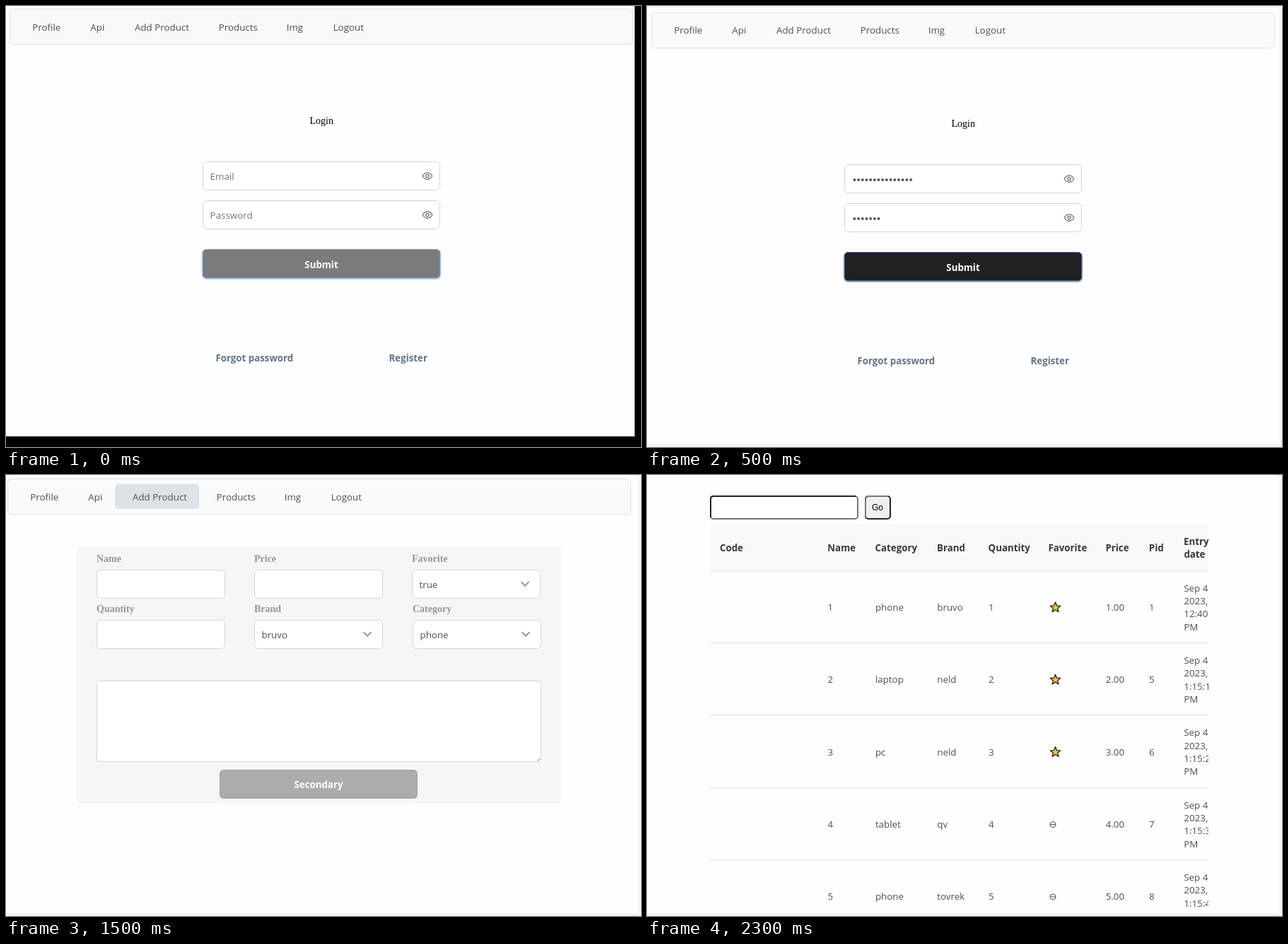
Write an HTML page that moves like this. It is 898x624 px and loops after 2.5 s.

```html
<!DOCTYPE html>
<html lang="en">
<head>
<meta charset="utf-8">
<title>Shop admin tour</title>
<style>
  html, body { margin: 0; width: 100%; height: 100%; overflow: hidden; background: #fefefe; }
  svg { display: block; width: 898px; height: 624px; }
  text { font: 13.35px "Open Sans", sans-serif; fill: #495057; }
  .hint { fill: #6c757d; }
  .bold { font-weight: 700; font-size: 13.3px; }
  .head { fill: #343a40; }
  .link { fill: #64748b; }
  .white { fill: #fff; }
  .mid { text-anchor: middle; }
  .serif { font: 14px "Liberation Serif", serif; fill: #000; }
  .label { font-weight: 700; fill: #979797; }
  .go { font: 12px "Liberation Sans", sans-serif; fill: #000; }
  .field { fill: #fff; stroke: #d1d5d8; }
  .line { fill: none; stroke: #6c757d; stroke-width: 1.3; }
  .glow { stroke: #6d97e2; filter: drop-shadow(0 1px 1px #8fb0e8); }
  .dark { stroke: #3f6cba; filter: drop-shadow(0 1px 1px #0008); }
  .scene { visibility: hidden; animation: show 2.5s step-end infinite; }
  @keyframes show {
    0% { visibility: visible; }
    20%, 100% { visibility: hidden; }
  }
</style>
</head>
<body>
<svg id="stage" viewBox="0 0 898 624"></svg>
<script>
const text = (x, y, str, cls = '') => `<text x="${x}" y="${y}" class="${cls}">${str}</text>`;
const rect = (x, y, w, h, attrs = '') =>
  `<rect x="${x}" y="${y}" width="${w}" height="${h}" ${attrs}/>`;
const path = (d, attrs = 'class="line"') => `<path d="${d}" ${attrs}/>`;
const at = (x, y, body) => `<g transform="translate(${x} ${y})">${body}</g>`;
const times = (n, fn) => Array.from({ length: n }, (_, i) => fn(i)).join('');

// Boxes take their outer pixel edges; the 1px stroke sits inside.
const box = (x, y, w, h, attrs = 'class="field"') =>
  rect(x + .5, y + .5, w - 1, h - 1, `rx="5" ${attrs}`);

const eye = (x, y) => at(x, y,
  path('M-6.8 0C-3.6-6.3 3.6-6.3 6.8 0C3.6 6.3-3.6 6.3-6.8 0Z') +
  '<circle r="2.2" class="line"/>');

const chevron = (x, y) => path(`M${x - 5.5} ${y - 2.7}l5.5 5.5 5.5-5.5`);

const menu = [['Profile', 0], ['Api', 82], ['Add Product', 144.7], ['Products', 263.4],
  ['Img', 359.4], ['Logout', 425.4]];

function nav(x, y, base, fill, active = '') {
  return box(x, y, 882, 51, `fill="${fill}" stroke="#dee2e6"`) + active +
    menu.map(([name, dx]) => text(x + 32.3 + dx, base, name)).join('');
}

function input(y, hint, withEye = true) {
  return box(278, y, 336, 41) + text(288.6, y + 26, hint, 'hint') +
    (withEye ? eye(596, y + 20.5) : '');
}

const dots = (y, n) => times(n, i =>
  `<circle cx="${292.4 + i * 5.69}" cy="${y}" r="1.9" fill="#495057"/>`);

const submit = (y, fill, cls) =>
  rect(278.2, y + .5, 335.6, 40.3, `rx="5" fill="${fill}" class="${cls}"`) +
  text(446, y + 27, 'Submit', 'bold white mid');

const loginForm = (fields, button) =>
  text(446.2, 167.4, 'Login', 'serif mid') + fields + button +
  text(296.4, 503, 'Forgot password', 'bold link') +
  text(541.5, 503, 'Register', 'bold link');

const frame = lineFrom =>
  rect(lineFrom, 1, 894 - lineFrom, 1, 'fill="#e4e7e9"') +
  rect(894, 0, 4, 624, 'fill="#f3f4f4"') +
  rect(0, 620, 898, 4, 'fill="#f3f4f4"');

const emptyLogin =
  rect(889, 0, 9, 624) + rect(0, 609, 898, 15) +
  nav(5, 4, 35, '#f8f9fa') +
  loginForm(input(220, 'Email') + input(275, 'Password'), submit(344, '#7b7b7b', 'glow'));

const filledLogin =
  frame(0) + nav(6, 9, 39.4, '#f9fbf9') +
  at(1, 4, loginForm(
    input(220, '') + dots(241.9, 15) + input(275, '') + dots(296.9, 7),
    submit(344, '#212121', 'dark')));

const register =
  frame(0) + nav(5, 9, 39.4, '#f8f9fa') +
  text(446, 131.4, 'Register', 'serif mid') +
  input(184, 'Email') + input(239, 'Password') + input(294, 'Confirm Password') +
  input(342, 'Age', false) + input(390, 'Nickname', false) +
  rect(279, 460, 17.5, 18, 'rx="4" fill="#fff" stroke="#ced4da" stroke-width="2"') +
  text(304, 472, 'Agree with terms', 'serif') +
  submit(500, '#7b7b7b', 'glow');

function cell(x, y, label, value) {
  return text(x, y - 11, label, 'serif label') + box(x, y, 182, 41) +
    (value ? text(x + 10.5, y + 26, value) + chevron(x + 160, y + 20) : '');
}

const addProduct =
  frame(887) +
  nav(2, 5, 36, '#f9fafa', rect(154, 13, 119, 35, 'rx="5" fill="#dee2e6"')) +
  rect(100, 100.5, 685, 364, 'rx="5" fill="#f6f6f6"') +
  cell(128, 134, 'Name') + cell(351, 134, 'Price') + cell(574, 134, 'Favorite', 'true') +
  cell(128, 205, 'Quantity') + cell(351, 205, 'Brand', 'bruvo') +
  cell(575, 205, 'Category', 'phone') +
  box(128, 291, 629, 115) + path('M752 404.5l3.5-3.5', 'stroke="#777"') +
  box(302, 417, 280, 41, 'fill="#acacac" stroke="#9ea2a8"') +
  text(442, 443.4, 'Secondary', 'bold white mid');

// Alternating outer and inner points around the centre.
const star = (x, y) => at(x, y, '<polygon points="' + times(10, i => {
  const r = i % 2 ? 3.3 : 7.6, a = i * Math.PI / 5;
  return `${(r * Math.sin(a)).toFixed(2)},${(-r * Math.cos(a)).toFixed(2)} `;
}) + '" fill="#fcc133" stroke="#222" stroke-width="1.3" stroke-linejoin="round"/>');

const minus = (x, y) => at(x, y,
  '<circle r="4" fill="none" stroke="#495057"/>' + path('M-4 0H4', 'stroke="#495057"'));

const columns = [['Code', 103], ['Name', 255.3], ['Category', 322.6], ['Brand', 410],
  ['Quantity', 482.6], ['Favorite', 567.4], ['Price', 648.4], ['Pid', 709.8]];

const rows = [
  ['phone', 'bruvo', 1, '12:40:05'],
  ['laptop', 'neld', 5, '1:15:14'],
  ['pc', 'neld', 6, '1:15:26'],
  ['tablet', 'qv', 7, '1:15:35'],
  ['phone', 'tovrek', 8, '1:15:47']
];

function row([category, brand, pid, time], i) {
  const n = i + 1, y = 187 + i * 102.35;
  const values = ['', n, category, brand, n, '', n + '.00', pid];
  return values.map((v, c) => text(columns[c][1] + .3, y + 5, v)).join('') +
    (i < 3 ? star(577.5, y + .5) : minus(574, y + .5)) +
    ['Sep 4,', '2023,', time, 'PM'].map((s, k) =>
      text(759.3, y - 22.3 + k * 18.3, s)).join('') +
    rect(89, Math.round(y + 50), 705, 1, 'fill="#dfe2e5"');
}

// Two-tone bevel: one colour for the whole edge, the other for top and left.
const bevel = (x, w, fill, edge, top) =>
  rect(x + 1, 30, w - 2, 32, `rx="4" fill="${fill}" stroke="${edge}" stroke-width="2"`) +
  path(`M${x + 1} 60V34q0-4 4-4H${x + w - 4}`, `fill="none" stroke="${top}" stroke-width="2"`);

const products =
  bevel(89, 210, '#fff', '#767676', '#222') +
  bevel(308, 37, '#efefef', '#222', '#767676') +
  text(326, 50, 'Go', 'go mid') +
  '<clipPath id="table"><rect x="89" y="70" width="705" height="554"/></clipPath>' +
  '<g clip-path="url(#table)">' +
  rect(89, 70, 705, 65, 'fill="#f9f9f9"') + rect(89, 135, 705, 1, 'fill="#dfe2e5"') +
  columns.map(([name, x]) => text(x, 108, name, 'bold head')).join('') +
  text(759, 99, 'Entry', 'bold head') + text(759.4, 117, 'date', 'bold head') +
  rows.map(row).join('') + '</g>' + frame(889);

const scenes = [emptyLogin, filledLogin, register, addProduct, products];
document.getElementById('stage').innerHTML = scenes.map((body, i) =>
  `<g class="scene" style="animation-delay:${i * 500 - 2500}ms">${body}</g>`).join('');
</script>
</body>
</html>
```
